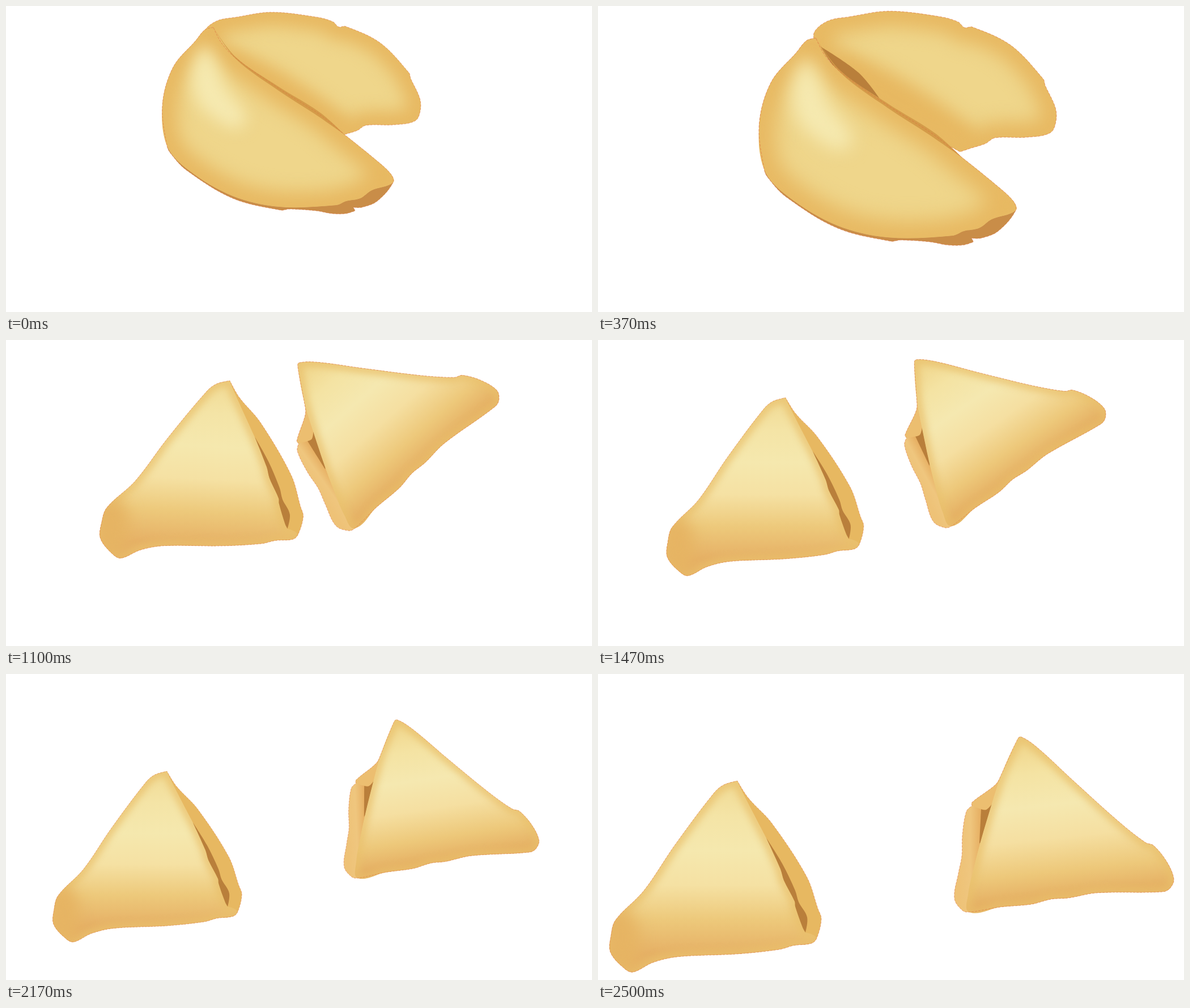
An HTML page that plays this animation: 1034 by 541 pixels, repeating every 2830 ms.

```html
<!DOCTYPE html>
<html lang="en">
<head>
<meta charset="utf-8">
<title>Fortune cookie</title>
<style>
html, body { margin: 0; width: 100%; height: 100%; overflow: hidden; background: #fff; }
svg { display: block; width: 100%; height: 100%; }
</style>
</head>
<body>
<svg id="stage" viewBox="0 0 1034 541"><defs></defs></svg>
<script>
const NS = 'http://www.w3.org/2000/svg';
const stage = document.getElementById('stage');
const defs = stage.firstElementChild;
const GOLD = '#e7b861', CREAM = '#efd68b', PALE = '#f5e9b0', DARK = '#b97f3b', CREASE = '#d49b49';

function add(parent, tag, attrs = {}) {
  const el = document.createElementNS(NS, tag);
  for (const key in attrs) el.setAttribute(key, attrs[key]);
  return parent.appendChild(el);
}

function softener(blur) {
  const id = 'soft' + blur;
  if (!document.getElementById(id)) {
    const f = add(defs, 'filter', {
      id, x: '-100%', y: '-100%', width: '300%', height: '300%', 'color-interpolation-filters': 'sRGB'
    });
    add(f, 'feGaussianBlur', { stdDeviation: blur });
  }
  return `url(#${id})`;
}

// Linear gradient with evenly spaced colours.
function gradient(id, x1, y1, x2, y2, colors) {
  const g = add(defs, 'linearGradient', { id, gradientUnits: 'userSpaceOnUse', x1, y1, x2, y2 });
  colors.forEach((c, i) => add(g, 'stop', { offset: i / (colors.length - 1), 'stop-color': c }));
  return `url(#${id})`;
}

// Smooth closed curve through "x,y" points; a trailing "!" makes a corner.
function curve(text) {
  const pts = text.trim().split(/\s+/).map(t => {
    const [x, y] = t.replace('!', '').split(',').map(Number);
    return { x, y, corner: t.endsWith('!') };
  });
  const n = pts.length, at = i => pts[(i + n) % n];
  const handle = (i, len) => {
    const p = at(i), a = at(i - 1), b = at(i + 1);
    const k = p.corner ? 0 : len / 3 / Math.hypot(b.x - a.x, b.y - a.y);
    return [p.x + (b.x - a.x) * k, p.y + (b.y - a.y) * k];
  };
  let d = `M${pts[0].x} ${pts[0].y}`;
  for (let i = 0; i < n; i++) {
    const p = at(i), q = at(i + 1), len = Math.hypot(q.x - p.x, q.y - p.y);
    d += `C${handle(i, len)} ${handle(i + 1, -len)} ${q.x} ${q.y}`;
  }
  return d + 'Z';
}

const fill = (g, pts, color) => add(g, 'path', { d: curve(pts), fill: color });

const glow = (g, pts, color, blur, opacity = 1) =>
  add(g, 'path', { d: curve(pts), fill: color, opacity, filter: softener(blur) });

const edge = (g, pts) => add(g, 'path', {
  d: curve(pts), fill: 'none', stroke: '#dd6a3e', 'stroke-width': .7,
  'stroke-dasharray': '4 2', 'stroke-opacity': .75
});

// Filled shape that fades to a rim tone at its border; returns the clipped group.
function shaded(g, pts, color, rim, width, opacity = 1) {
  const d = curve(pts), id = 'clip' + stage.querySelectorAll('clipPath').length;
  add(add(defs, 'clipPath', { id }), 'path', { d });
  const inner = add(g, 'g', { 'clip-path': `url(#${id})` });
  add(inner, 'path', { d, fill: color });
  add(inner, 'path', {
    d, fill: 'none', stroke: rim, 'stroke-width': width, opacity, filter: softener(width * .3)
  });
  return inner;
}

function makeBack() {
  const g = add(stage, 'g');
  const shape = `405,20 468,11 550,20 577,28 587,37 599,36 660,65 711,118 714,128 730,163 731,185
    722,203 685,210 635,211 620,220 598,227 580,233! 480,175 395,110 352,60 351,43 373,26`;
  const inner = shaded(g, shape, CREAM, GOLD, 48);
  glow(inner, '395,75 600,195 600,235 400,130', GOLD, 14);
  edge(g, shape);
  return g;
}

function makeFront() {
  const g = add(stage, 'g');
  const arc = '366,38! 351,42 335,61 295,108 276,175 284,247 ';
  const lip = '683,312 679,297 650,270 598,228! 555,193 480,145 405,92 380,65';
  const shape = arc + `290,260 318,290 400,340 485,361 500,359 547,362 575,367 600,367
    616,362! 613,356! 628,356 655,345 ` + lip;
  const face = arc + '322,290 400,336 482,355 583,352 600,345 625,340 645,326 ' + lip;
  fill(g, shape, '#c98d48');
  const inner = shaded(g, face, CREAM, GOLD, 54);
  glow(inner, '348,70 328,130 350,185 420,210 385,140 362,85', PALE, 14);
  fill(g, '366,38! 405,90 480,142 555,189 598,228! 545,191 480,149 405,93', CREASE);
  edge(g, shape);
  return g;
}

function makeLeft() {
  const g = add(stage, 'g');
  const foot = ` 377,476 345,480 320,487 245,495 140,500 97,510 62,527 47,521 22,492 23,462 31,435
    81,383 136,302 205,210 222,196 246,189! `;
  const seam = '297,290! 322,345 328,365 347,402 348,411 361,448 366,457! ';
  const shape = '265,219 306,263 368,358 388,415 394,433 386,467' + foot;
  const dough = gradient('leftDough', 0, 190, 0, 495,
    ['#f1da94', '#f4e4a6', '#f5e8ae', '#f5e1a3', '#edc97b', '#e6b065']);
  fill(g, shape, GOLD);
  const inner = shaded(g, '252,203 ' + seam + '384,465' + foot, dough, '#e9c06c', 20, .7);
  glow(inner, '10,430 60,425 70,500 40,540', '#e6b463', 14);
  fill(g, seam + '369,430 354,403 348,383 325,335', DARK);
  edge(g, shape);
  return g;
}

function makeRight() {
  const g = add(stage, 'g');
  const far = `746,111 775,130 840,190 920,262 966,298 980,303 1003,331 1016,362 1010,378 997,385
    880,387 830,396 800,398 765,407 710,412 655,421 `;
  const shape = far + `643,418 629,397 636,352 642,322 643,285 650,243 660,233! 660,227 702,195
    712,177 740,116`;
  const dough = gradient('rightDough', 780, 115, 811, 408,
    ['#f0d58a', '#f4e3a3', '#f5e8b0', '#f5dfa1', '#edc87a', '#e3a85c']);
  fill(g, shape, gradient('flap', 638, 0, 676, 0, ['#eec277', '#efc67e', '#e6ae61']));
  fill(g, '660,233! 660,227 702,195 712,177! 694,232 684,240', '#ecbe70');
  fill(g, '676,239! 685,240 695,230! 684,284 673,300!', DARK);
  shaded(g, far + '653,390 665,335 674,300 688,252 712,177 740,116', dough, '#e9c06c', 20, .7);
  edge(g, shape);
  return g;
}

const back = makeBack();
const gap = fill(stage, '393,72! 460,118 500,168! 440,136', DARK);
const front = makeFront(), left = makeLeft(), right = makeRight();

function place(el, [px, py], [x, y], scale, turn = 0) {
  el.setAttribute('transform', `translate(${x} ${y}) rotate(${turn}) scale(${scale}) translate(${-px} ${-py})`);
}

const show = (el, on) => el.setAttribute('display', on ? 'inline' : 'none');

const LOOP = 2830;
const STEPS = [0, 370, 700, 1100, 1470, 1840, 2170, 2500];
const FRONT_TIP = [683, 308], BACK_TIP = [731, 185], APEX = [246, 189], HEEL = [653, 421];
const apexPath = [[429, 72], [395, 72], [331, 102], [301, 128], [284, 172], APEX];
const heelPath = [[606, 337], [614, 334], [622, 330], [618, 343], [619, 361], HEEL];

function drawWhole(open) {
  place(front, FRONT_TIP, open ? [737, 357] : FRONT_TIP, open ? 1.112 : 1);
  place(back, BACK_TIP, open ? [808, 204] : BACK_TIP, open ? 1.12 : 1);
}

// The halves shrink as they drift apart, then jump forward on the last step.
function drawHalves(k) {
  const scale = k < 5 ? .984 - .03 * k + .0018 * k * k : 1;
  const leftTurn = Math.max(0, 5.9 - 3 * k);
  const rightTurn = Math.min(0, -41.6 + 6.6 * k + 6.3 * Math.max(0, k - 2));
  place(left, APEX, apexPath[k], scale, leftTurn);
  place(right, HEEL, heelPath[k], scale, rightTurn);
}

function draw(time) {
  const step = STEPS.filter(at => at <= time % LOOP).length - 1;
  const whole = step < 2;
  show(front, whole);
  show(back, whole);
  show(gap, step === 1);
  show(left, !whole);
  show(right, !whole);
  if (whole) drawWhole(step === 1);
  else drawHalves(step - 2);
}

const start = performance.now();
function tick() {
  draw(performance.now() - start);
  requestAnimationFrame(tick);
}
tick();
</script>
</body>
</html>
```
